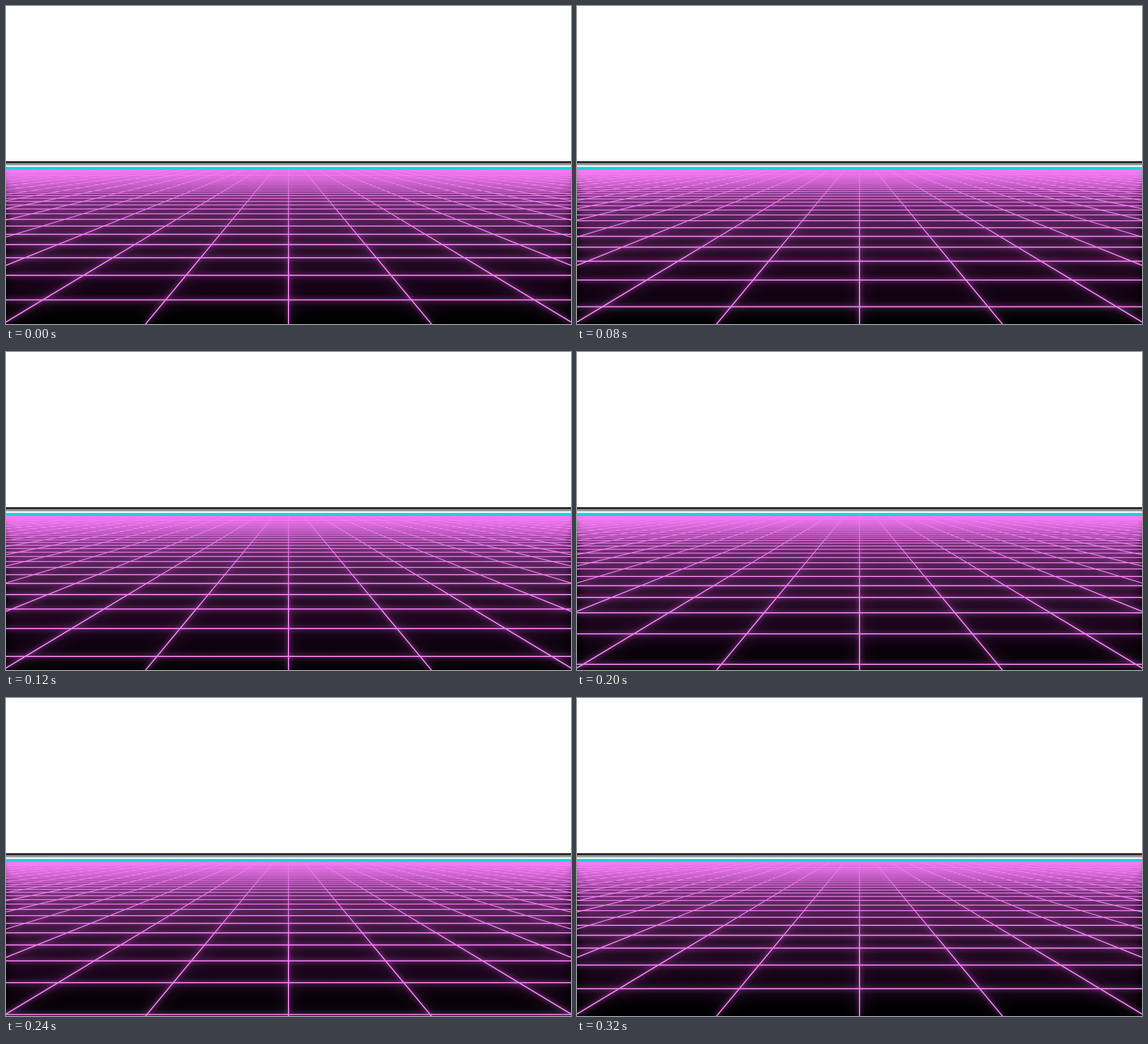
These frames come from a looping animation (998 px wide and 561 px high, 0.36 s). An HTML page with a canvas:

```html
<!DOCTYPE html>
<html lang="en">
<head>
<meta charset="utf-8">
<title>Neon grid</title>
<style>
  html, body { margin: 0; width: 100%; height: 100%; overflow: hidden; background: #fff; }
  canvas { display: block; }
</style>
</head>
<body>
<canvas id="stage" width="998" height="561"></canvas>
<script>
const W = 998, H = 561, CENTER = 499;
const VANISH = 257.5;      // height of the vanishing point
const FLOOR = 289;         // top of the visible floor
const DEPTH = 1310;        // row distance below the vanishing point = DEPTH / z
const SPREAD = 499 / 600;  // sideways slope between neighbouring rails
const NEAREST = 5.02, FAR = 20;
const LOOP = 360, STEPS = 9;

const ctx = document.getElementById('stage').getContext('2d');

function makeLayer() {
  const layer = document.createElement('canvas');
  layer.width = W;
  layer.height = H;
  return layer.getContext('2d');
}
const grid = makeLayer(), glow = makeLayer();

const rowWidth = d => Math.min(2, 0.4 + d * 0.01);
const railWidth = d => Math.min(2, 0.6 + d * 0.007);

function drawRail(n) {
  const slope = n * SPREAD, stretch = Math.hypot(1, slope) / 2;
  const bottom = H - VANISH + 4;
  const edge = (d, side) =>
    grid.lineTo(CENTER + slope * d + side * railWidth(d) * stretch, VANISH + d);
  grid.beginPath();
  edge(FAR, -1);
  edge(200, -1);
  edge(bottom, -1);
  edge(bottom, 1);
  edge(200, 1);
  edge(FAR, 1);
  grid.fill();
}

function drawGrid(phase) {
  grid.clearRect(0, 0, W, H);
  grid.fillStyle = '#f882f8';
  for (let z = NEAREST - 1 - phase; z < DEPTH / FAR; z++) {
    const d = DEPTH / z, w = rowWidth(d);
    grid.fillRect(0, VANISH + d - w / 2, W, w);
  }
  for (let n = -30; n <= 30; n++) drawRail(n);
}

function tintGlow() {
  glow.globalCompositeOperation = 'copy';
  glow.drawImage(grid.canvas, 0, 0);
  glow.globalCompositeOperation = 'source-in';
  glow.fillStyle = '#e468e6';
  glow.fillRect(0, 0, W, H);
}

function band(color, top, bottom) {
  ctx.fillStyle = color;
  ctx.fillRect(0, top, W, bottom - top);
}

function drawHorizon() {
  band('#fff', 0, FLOOR);
  band('#000', 274, 276);
  band('#626262', 276, 278);
  band('#9c9c9c', 278, 281);
  band('#f0f6f6', 281, 284);
  band('#18d2dc', 284, FLOOR);
}

const haze = ctx.createLinearGradient(0, FLOOR, 0, 550);
haze.addColorStop(0, '#5a225a');
haze.addColorStop(0.25, '#280c28');
haze.addColorStop(0.55, '#1a061a');
haze.addColorStop(0.85, '#0e000f');
haze.addColorStop(1, '#000');

function drawHaze() {
  ctx.filter = 'blur(12px)';
  band(haze, VANISH - 20, 550);
}

function drawBlur(radius, alpha) {
  ctx.filter = `blur(${radius}px)`;
  ctx.globalAlpha = alpha;
  ctx.drawImage(glow.canvas, 0, 0);
}

function render(step) {
  drawGrid(step / STEPS);
  tintGlow();
  drawHorizon();
  ctx.save();
  ctx.beginPath();
  ctx.rect(0, FLOOR, W, H - FLOOR);
  ctx.clip();
  band('#000', FLOOR, H);
  drawHaze();
  drawBlur(13, 0.8);
  drawBlur(4.5, 0.9);
  ctx.filter = 'none';
  ctx.globalAlpha = 1;
  ctx.drawImage(grid.canvas, 0, 0);
  ctx.restore();
}

let shown = 0, start;
render(0);

function tick(now) {
  start ??= now;
  const step = Math.floor((now - start) % LOOP / (LOOP / STEPS));
  if (step !== shown) render(shown = step);
  requestAnimationFrame(tick);
}
requestAnimationFrame(tick);
</script>
</body>
</html>
```
